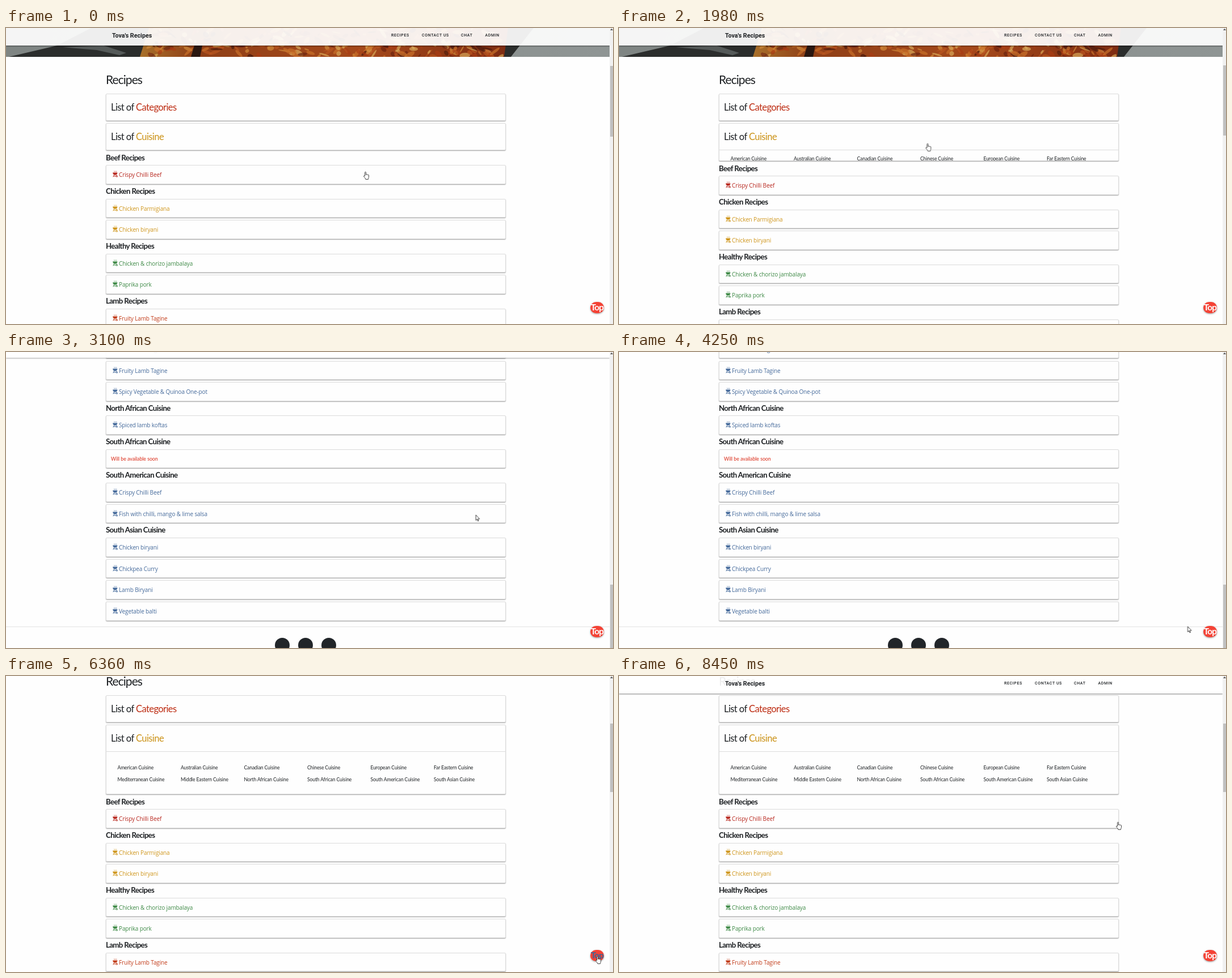
Write an HTML page that moves like this. It is 1070x523 px and loops after 8510 ms.

```html
<!DOCTYPE html>
<html lang="en">
<head>
<meta charset="utf-8">
<title>Recipes</title>
<style>
* { box-sizing: border-box; }
html, body { margin: 0; width: 100%; height: 100%; overflow: hidden; }
body { position: relative; background: #fefefe; color: #1d2023; font: 10px/1 "Open Sans", "Noto Sans", sans-serif; }
body * { animation: 8510ms linear infinite; white-space: nowrap; }
.abs, nav, nav span, #head, #tail, #cursor, #cursor > *, #top, #top span, #thumb, #track, footer, footer i { position: absolute; }
.narrow, h1, h2, h3 { font-family: Lato, "Liberation Sans", sans-serif; margin: 0; }

/* page */
#head, #tail { left: 0; top: 0; width: 1064px; height: 523px; }
#head { animation-name: head; animation-timing-function: step-end; }
#tail { visibility: hidden; animation-name: tail; animation-timing-function: step-end; }
#hero { position: absolute; left: 0; top: 0; }
.list { position: absolute; left: 176px; width: 705px; }
h1 { position: absolute; left: 176px; top: 78px; font-size: 21px; line-height: 26px; font-weight: 400; letter-spacing: -.045em; }
h2 { font-size: 16.5px; line-height: 46px; font-weight: 400; padding-left: 8px; letter-spacing: -.035em; }
h3 { font-size: 13.2px; line-height: 16px; font-weight: 700; margin-bottom: 5.6px; letter-spacing: -.045em; }
.card { height: 33.6px; margin-bottom: 4.1px; background: #fefefe; border: 1px solid #dcdcdc; border-radius: 2px; box-shadow: 0 1px 1.5px rgba(0,0,0,.36); line-height: 32px; padding-left: 10px; letter-spacing: -.13px; }
.card svg { width: 11px; height: 12px; vertical-align: -1px; margin-right: 1px; fill: currentColor; stroke: currentColor; }
.card.soon { color: #d9230f; font-size: 8.7px; padding-left: 8px; letter-spacing: 0; }
.fold { height: auto; margin-bottom: 4.4px; padding: 0; letter-spacing: 0; }
.panel { height: 0; overflow: hidden; animation-name: open; }
.links { height: 75px; border-top: 1px solid #dcdcdc; animation-name: settle; }
.grid { position: relative; }
.links span { position: absolute; font-size: 8.6px; line-height: 12px; letter-spacing: -.015em; }
.links .hot { animation-name: hot; animation-timing-function: step-end; }
footer { left: 0; top: 484.5px; width: 1064px; height: 60px; border-top: 1px solid #e3e3e3; }
footer i { top: 19px; width: 26px; height: 26px; border-radius: 50%; background: #212529; }

/* fixed parts */
nav { left: 0; top: 0; width: 1064px; height: 31px; background: rgba(255,255,255,.92); box-shadow: 0 1px 2px rgba(0,0,0,.5); font: 500 7px/27px Roboto, sans-serif; letter-spacing: .62px; animation-name: nav; }
nav .brand { left: 187px; font-size: 10.7px; font-weight: 700; letter-spacing: 0; }
#track { left: 1064px; top: 0; width: 6px; height: 523px; background: #f1f1f1; }
#track svg { position: absolute; left: 1px; top: 0; }
#thumb { left: 1px; width: 5px; background: #c1c1c1; animation-name: thumb, grip; animation-timing-function: step-end; }
#top { left: 1030px; top: 484px; width: 23.5px; height: 20px; border-radius: 10px; background: #f44336; box-shadow: 0 1px 3px rgba(0,0,0,.4); }
#top span { left: 0; width: 24px; display: flex; justify-content: center; color: #fff; font-size: 15.5px; line-height: 19px; font-weight: 700; letter-spacing: -.06em; animation-name: topHot; animation-timing-function: step-end; }
#cursor { left: 0; top: 0; animation-name: move; }
#cursor svg { overflow: visible; fill: #fff; stroke: #2a2a2a; stroke-width: .9; stroke-linejoin: round; }
#spot { left: -6.5px; top: -5.5px; width: 13px; height: 13px; border-radius: 50%; background: #fbee36; opacity: 0; animation-name: spot; animation-timing-function: step-end; }
#hand { left: -3.6px; top: 0; animation-name: hand; animation-timing-function: step-end; }
#arrow { left: 0; top: 0; animation-name: arrow; animation-timing-function: step-end; }

@keyframes head {
  0% { visibility: visible; transform: none; }
  34.43% { visibility: hidden; transform: none; }
  73.678%, 100% { visibility: visible; transform: translateY(-82px); }
}
@keyframes tail { 0%, 73.678%, 100% { visibility: hidden; } 34.43% { visibility: visible; } }
@keyframes open {
  0%, 21.868% { height: 0; animation-timing-function: cubic-bezier(.65,0,.35,1); }
  25.394%, 100% { height: 75px; }
}
@keyframes settle {
  0%, 21.868% { padding-top: 0; animation-timing-function: cubic-bezier(.65,0,.35,1); }
  25.394%, 100% { padding-top: 16.7px; }
}
@keyframes hot { 0%, 34.43%, 100% { color: #1d2023; } 30.55% { color: #1787a6; } }
@keyframes topHot { 0%, 75.8%, 100% { color: #fff; } 65.57% { color: #3f6494; } }
@keyframes nav {
  0%, 34.43% { transform: none; }
  37.955%, 75.558% { transform: translateY(-36px); }
  79.083%, 100% { transform: none; }
}
@keyframes thumb {
  0% { top: 67px; height: 125px; }
  21.868% { top: 67px; height: 125px; animation-timing-function: cubic-bezier(.65,0,.35,1); }
  25.394% { top: 65px; height: 121px; }
  34.43% { top: 411px; height: 121px; }
  73.678%, 100% { top: 83.5px; height: 121px; }
}
@keyframes grip {
  0%, 12%, 48%, 61.5%, 90.8%, 100% { background: #c1c1c1; }
  8%, 45.5%, 56%, 85.5% { background: #a8a8a8; }
}
@keyframes spot {
  0%, 22.444%, 34.43%, 73.678%, 100% { opacity: 0; }
  20.6%, 32.785%, 69.213% { opacity: 1; }
}
@keyframes hand {
  0%, 15%, 30.55%, 65.57%, 98.59%, 100% { visibility: visible; }
  2.3%, 24.5%, 34.43%, 75.8% { visibility: hidden; }
}
@keyframes arrow {
  0%, 15%, 30.55%, 65.57%, 98.59%, 100% { visibility: hidden; }
  2.3%, 24.5%, 34.43%, 75.8% { visibility: visible; }
}
@keyframes move {
  0%, 1.4% { transform: translate(634px, 254px); }
  3.643% { transform: translate(988px, 202px); }
  5.405% { transform: translate(1010px, 172px); }
  8.226% { transform: translate(1066px, 120px); }
  11.751% { transform: translate(1066px, 132px); }
  15.276% { transform: translate(862px, 175px); }
  18.214% { transform: translate(690px, 218px); }
  20.447%, 22% { transform: translate(537px, 180px); }
  23.267% { transform: translate(544px, 204px); }
  31.727%, 34.43% { transform: translate(780px, 263px); }
  43.596% { transform: translate(1000px, 376px); }
  45.828% { transform: translate(1066px, 430px); }
  47.591% { transform: translate(1066px, 470px); }
  49.941%, 50.881% { transform: translate(1002.5px, 485px); }
  51.704% { transform: translate(996px, 482px); }
  53.584% { transform: translate(1015px, 470px); }
  56.404% { transform: translate(1066px, 450px); }
  61.105% { transform: translate(1066px, 480px); }
  64.63% { transform: translate(1043px, 508px); }
  68.155%, 74.8% { transform: translate(1043px, 495px); }
  82.961% { transform: translate(1058px, 190px); }
  85.781% { transform: translate(1066px, 150px); }
  90.482% { transform: translate(1066px, 128px); }
  93.067% { transform: translate(1024px, 146px); }
  96.592%, 100% { transform: translate(880px, 258px); }
}
</style>
</head>
<body>
<svg width="0" height="0" class="abs">
  <symbol id="grill" viewBox="0 0 11 12">
    <path d="M3.5.6l.5 1-.5 1M5.5.6l.5 1-.5 1M7.5.6l.5 1-.5 1" fill="none" stroke-width=".7"/>
    <path d="M1.2 3.4h8.2c0 2.2-1.4 3.6-3 4H4.2c-1.6-.4-3-1.8-3-4z" stroke="none"/>
    <path d="M4 7L1.8 11.2M6.6 7l1.4 2M2.6 9.8h4.5" fill="none"/>
    <circle cx="8.4" cy="10" r="1.2" fill="none"/>
  </symbol>
</svg>

<main id="head">
  <svg id="hero" width="1064" height="51">
    <defs>
      <linearGradient id="wall"><stop offset="0" stop-color="#7f8583"/><stop offset="1" stop-color="#8f9594"/></linearGradient>
      <linearGradient id="glaze"><stop offset="0" stop-color="#a8702a"/><stop offset=".15" stop-color="#8f3f17"/><stop offset=".6" stop-color="#a5491b"/><stop offset="1" stop-color="#7d2c12"/></linearGradient>
    </defs>
    <rect width="1064" height="51" fill="url(#wall)"/>
    <path d="M5 51L90 31 150 0H930L890 51z" fill="#2b2d2c"/>
    <path d="M100 34L172 31 212 44 200 48 160 39z" fill="#555a59"/>
    <path d="M236 51L252 0H885L878 51z" fill="url(#glaze)"/>
    <g id="food"></g>
    <path d="M326 51l6-20h14l-4 20z" fill="#2a1710"/>
  </svg>
  <h1>Recipes</h1>
  <div class="list" style="top:116px">
    <div class="card fold"><h2>List of <span style="color:#bd2c12">Categories</span></h2></div>
    <div class="card fold"><h2>List of <span style="color:#cb9217">Cuisine</span></h2>
      <div class="panel"><div class="links narrow"><div class="grid"></div></div></div>
    </div>
    <div id="first"></div>
  </div>
</main>

<main id="tail">
  <div class="list" id="last" style="top:-22.2px"></div>
  <footer><i style="left:474px"></i><i style="left:515px"></i><i style="left:556px"></i></footer>
</main>

<nav>
  <span class="brand">Tova's Recipes</span>
  <span style="left:679px">RECIPES</span><span style="left:733px">CONTACT US</span><span style="left:802px">CHAT</span><span style="left:844.5px">ADMIN</span>
</nav>
<div id="top"><span class="narrow">Top</span></div>
<div id="track"><svg width="5" height="4"><path d="M0 4L2.5 1 5 4z" fill="#555"/></svg><div id="thumb"></div></div>
<div id="cursor">
  <div id="spot"></div>
  <svg id="hand" width="10" height="14"><path d="M2.6 7.6V1.3a1 1 0 0 1 2 0v4c.1-.9 1.7-.8 1.8.1.2-.7 1.6-.6 1.7.3.3-.6 1.4-.4 1.4.5v3.2c0 1.6-1 2-1 4H4C3.7 11.3 1.6 10 .6 8.2.1 7.2 1.3 6.7 2.6 7.6z"/></svg>
  <svg id="arrow" width="8" height="11"><path d="M0 0v9.6l2.2-2 1.4 3.4 1.4-.6-1.4-3.3h3z"/></svg>
</div>

<script>
const $ = q => document.querySelector(q);
const red = '#b8281f', gold = '#cf961c', green = '#3f8a47', orange = '#c23c1a', blue = '#456a9b';
const soon = '<div class="card soon narrow">Will be available soon</div>';
const card = (name, color) =>
  `<div class="card" style="color:${color}"><svg><use href="#grill"/></svg>${name}</div>`;
const section = ([title, color, ...names]) =>
  (title ? `<h3>${title}</h3>` : '') + (names.map(n => card(n, color)).join('') || soon);

$('#first').innerHTML = [
  ['Beef Recipes', red, 'Crispy Chilli Beef'],
  ['Chicken Recipes', gold, 'Chicken Parmigiana', 'Chicken biryani'],
  ['Healthy Recipes', green, 'Chicken &amp; chorizo jambalaya', 'Paprika pork'],
  ['Lamb Recipes', orange, 'Fruity Lamb Tagine']
].map(section).join('');

$('#last').innerHTML = [
  ['', blue, 'Stuffed aubergine', 'Fruity Lamb Tagine', 'Spicy Vegetable &amp; Quinoa One-pot'],
  ['North African Cuisine', blue, 'Spiced lamb koftas'],
  ['South African Cuisine', blue],
  ['South American Cuisine', blue, 'Crispy Chilli Beef', 'Fish with chilli, mango &amp; lime salsa'],
  ['South Asian Cuisine', blue, 'Chicken biryani', 'Chickpea Curry', 'Lamb Biryani', 'Vegetable balti']
].map(section).join('');

const places = ['American', 'Australian', 'Canadian', 'Chinese', 'European', 'Far Eastern',
  'Mediterranean', 'Middle Eastern', 'North African', 'South African', 'South American', 'South Asian'];
$('.grid').innerHTML = places.map((p, i) => {
  const x = 19.5 + 111.5 * (i % 6), y = 4.5 + 21 * Math.floor(i / 6);
  return `<span class="${p == 'South Asian' ? 'hot' : ''}" style="left:${x}px;top:${y}px">${p} Cuisine</span>`;
}).join('');

// glazed food texture
let seed = 7;
const rnd = () => (seed = seed * 16807 % 2147483647) / 2147483647;
const tones = ['#d08a3a', '#6b2410', '#b9551f', '#d9a95a', '#48190d', '#a83c14', '#c9702a'];
let food = '';
for (let i = 0; i < 280; i++) {
  const x = 254 + rnd() * 618, y = rnd() * 51, turn = rnd() * 120 - 60;
  food += `<ellipse rx="${2 + rnd() * 9}" ry="${1 + rnd() * 3.5}" fill="${tones[i % 7]}" opacity=".7" transform="translate(${x} ${y}) rotate(${turn})"/>`;
}
$('#food').innerHTML = food;
</script>
</body>
</html>
```
